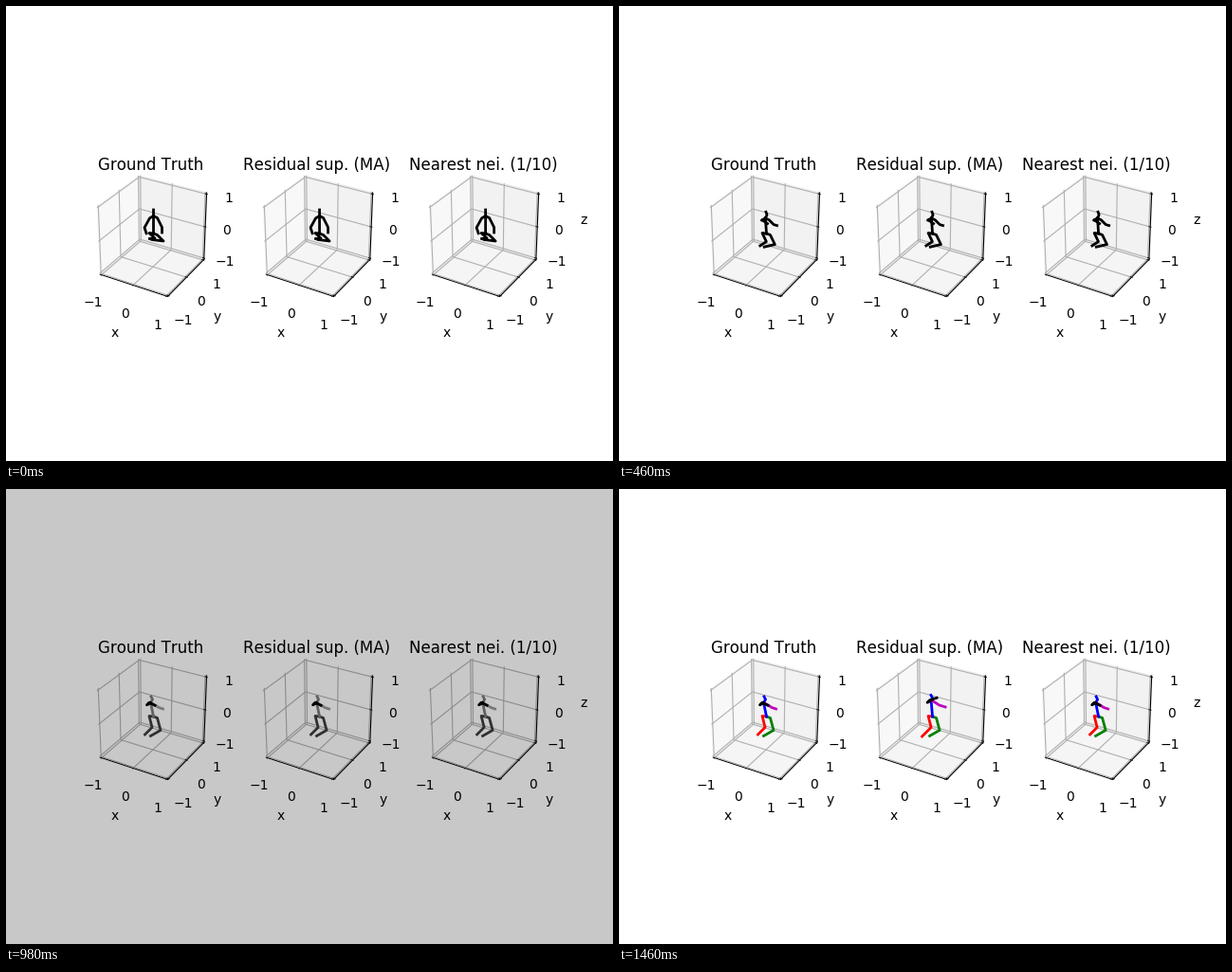
Write a matplotlib script that moves like this. It is 640 by 480 pixels and loops after 1480 ms.

```python
import numpy as np
import matplotlib.pyplot as plt
from matplotlib.animation import FuncAnimation
from matplotlib.patches import Polygon, Rectangle

plt.rcParams["text.kerning_factor"] = 6     # whole-pixel letter spacing

W, H, DPI = 640, 480, 100
FRAMES, STEP = 74, 20
FLASH = 49                      # single grey frame before the colours appear
LEFT, SIDE = 80, 145.88         # first panel's left edge and panel size in pixels
PITCH = SIDE * 1.2
SCALE = SIDE / 0.185
ORIGIN = np.array([LEFT + 0.095 * SCALE, 240.43])
EDGE = 1 + 1 / 24               # cube half-width, slightly padded
TICK_GAP, LABEL_GAP = 0.438, 0.952

TITLES = ["Ground Truth", "Residual sup. (MA)", "Nearest nei. (1/10)"]
GRID, GREY, FLASH_GRID = "#b0b0b0", "#c8c8c8", "#8c8c8c"
BACK = np.array([-1, 1, -1])                        # far corner of the cube
HOME = np.array([(0, -1, -1), (1, 0, -1), (1, 1, 0)])   # edge that carries each axis

elev, azim = np.radians([30, -60])
TOWARD = np.array([np.cos(azim) * np.cos(elev), np.sin(azim) * np.cos(elev), np.sin(elev)])
RIGHT = np.array([-np.sin(azim), np.cos(azim), 0])
UP = np.cross(TOWARD, RIGHT)

fig = plt.figure(figsize=(W / DPI, H / DPI), dpi=DPI, facecolor="white")
ax = fig.add_axes([0, 0, 1, 1])
ax.set_xlim(0, W)
ax.set_ylim(H, 0)
ax.set_axis_off()
backdrop = ax.add_patch(Rectangle((-1, -1), W + 2, H + 2, fc="white", ec="none", zorder=0))
panes, grid_lines = [], []


def project(points, panel):
    """Perspective projection of points in [-1, 1]^3 to stage pixels."""
    p = np.atleast_2d(points) / 2
    depth = 10 - p @ TOWARD
    x = ORIGIN[0] + panel * PITCH + SCALE * (p @ RIGHT) / depth
    y = ORIGIN[1] - SCALE * (p @ UP) / depth
    return np.column_stack([x, y])


def flip(point, *axes):
    """Mirror a point to the opposite side along the given axes."""
    out = np.array(point, float)
    out[list(axes)] *= -1
    return out


def on_axis(k, t, reach=EDGE):
    """Point at value t beside axis k, reach away from the cube's centre."""
    out = reach * HOME[k]
    out[k] = t
    return out


def line(points, panel, **style):
    return ax.plot(*project(points, panel).T, **style)[0]


def label(point, panel, text, va):
    x, y = project(point, panel)[0]
    ax.text(x, y, text, fontsize=10, ha="center", va=va)


def draw_axis(k, n):
    i, j = [a for a in range(3) if a != k]
    tick_dir = 1 if k == 0 else 0
    outward = np.eye(3)[tick_dir] * HOME[k][tick_dir]
    line([on_axis(k, -EDGE), on_axis(k, EDGE)], n, color="k", lw=0.8)
    for t in (-1.0, 0.0, 1.0):
        base = EDGE * BACK
        base[k] = t
        grid_lines.append(line([flip(base, i), base, flip(base, j)], n, color=GRID, lw=0.8))
        foot = on_axis(k, t)
        line([foot + outward / 60, foot - outward / 30], n, color="k", lw=0.8)
        label(on_axis(k, t, EDGE + TICK_GAP), n, f"{t:.0f}".replace("-", "\u2212"), "top")
    if k < 2 or n == 2:         # only the last panel has room for z
        label(on_axis(k, 0, EDGE + LABEL_GAP), n, "xyz"[k], "center")


def draw_panel(n):
    corner = EDGE * BACK
    for k, tone in enumerate((0.95, 0.9, 0.925)):
        i, j = [a for a in range(3) if a != k]
        wall = [corner, flip(corner, i), flip(corner, i, j), flip(corner, j)]
        color = (tone, tone, tone, 0.5)
        panes.append(ax.add_patch(Polygon(project(wall, n), fc=color, ec=color, lw=1)))
    for k in range(3):
        draw_axis(k, n)
    ax.text(LEFT + n * PITCH + SIDE / 2, 172.8, TITLES[n], fontsize=12, ha="center")


def ease(t, start, end):
    u = np.clip((t - start) / (end - start), 0, 1)
    return u * u * (3 - 2 * u)


def pulse(t, centre, width):
    return np.exp(-((t - centre) / width) ** 2)


def vec(x, y):
    return np.array([x, y], float)


def limbs(t, drift):
    """Colour, grey tone and joints of each limb, in pixels of the first panel."""
    rise = ease(t, 300, 600)        # legs unfold
    lift = ease(t, 100, 600)        # arms come forward
    lean = pulse(t, 300, 120)       # body tips over before rising
    fold = pulse(t, 640, 100)       # right forearm bends back briefly

    # Upper body, shifted as a whole by the drift.
    sway = drift * vec(1.5, -2.5)
    pelvis = vec(155.5, 240)
    head = vec(155.5, 215) + lean * vec(5, 0.5) + rise * vec(-2.5, 4) + sway * 0.6
    neck = vec(155.5, 218) + lean * vec(6.5, 1) + rise * vec(-1, 4) + sway * 0.6
    chest = vec(155.5, 221.5) + lean * vec(3, 0.5) + rise * vec(-3, 4) + sway

    # Arms: each bone swings from hanging to reaching.
    l_shoulder = chest + vec(-4, 2.3)
    l_elbow = l_shoulder + vec(-5.5, 10) + lift * vec(8, -12.5)
    l_hand = l_elbow + vec(2, 6) + lift * vec(4, -3) + drift * vec(1.5, -5.5)
    r_shoulder = chest + vec(4, 2)
    r_elbow = r_shoulder + vec(5, 10) + lift * vec(-0.5, -7) + lean * vec(0.5, 3) + fold * vec(4, 0)
    r_hand = (r_elbow + vec(0, 5.5) + lift * vec(4.5, -4) + lean * vec(1, -7)
              + fold * vec(-12, -3) + drift * vec(2, 0.5))

    # Legs: knees and feet drop while the hips stay.
    l_hip, r_hip = pelvis + vec(-4.5, -0.5), pelvis + vec(4, 1.5)
    l_knee = vec(157, 245) + rise * vec(-3, 6.5)
    l_foot = vec(151.5, 245.5) + rise * vec(-5, 13.5) + drift * vec(-2, 2)
    r_knee = vec(166, 248) + rise * vec(-3, 6.5)
    r_foot = vec(154, 246.5) + rise * vec(-1.5, 14)

    return [("r", "#303030", [pelvis, l_hip, l_knee, l_foot]),
            ("g", "#303030", [pelvis, r_hip, r_knee, r_foot]),
            ("b", "#606060", [head, neck, chest, pelvis]),
            ("m", "#787878", [chest, r_shoulder, r_elbow, r_hand]),
            ("k", "#000000", [chest, l_shoulder, l_elbow, l_hand])]


for n in range(3):
    draw_panel(n)
bodies = [[ax.plot([], [], lw=2, zorder=4)[0] for _ in range(5)] for _ in range(3)]


def update(frame):
    flash = frame == FLASH
    backdrop.set_facecolor(GREY if flash else "white")
    for pane in panes:
        pane.set_visible(not flash)
    for g in grid_lines:
        g.set_color(FLASH_GRID if flash else GRID)

    t = frame * STEP
    for n, body in enumerate(bodies):
        drift = np.clip((t - 1000) / 460, 0, 1) if n == 1 else 0
        for limb, (color, tone, joints) in zip(body, limbs(t, drift)):
            x, y = np.transpose(joints)
            limb.set_data(x + n * PITCH, y)
            limb.set_color(tone if flash else color if frame > FLASH else "k")
    return []


anim = FuncAnimation(fig, update, frames=FRAMES, interval=STEP, repeat=True,
                     repeat_delay=0, blit=False)
plt.show()
```
